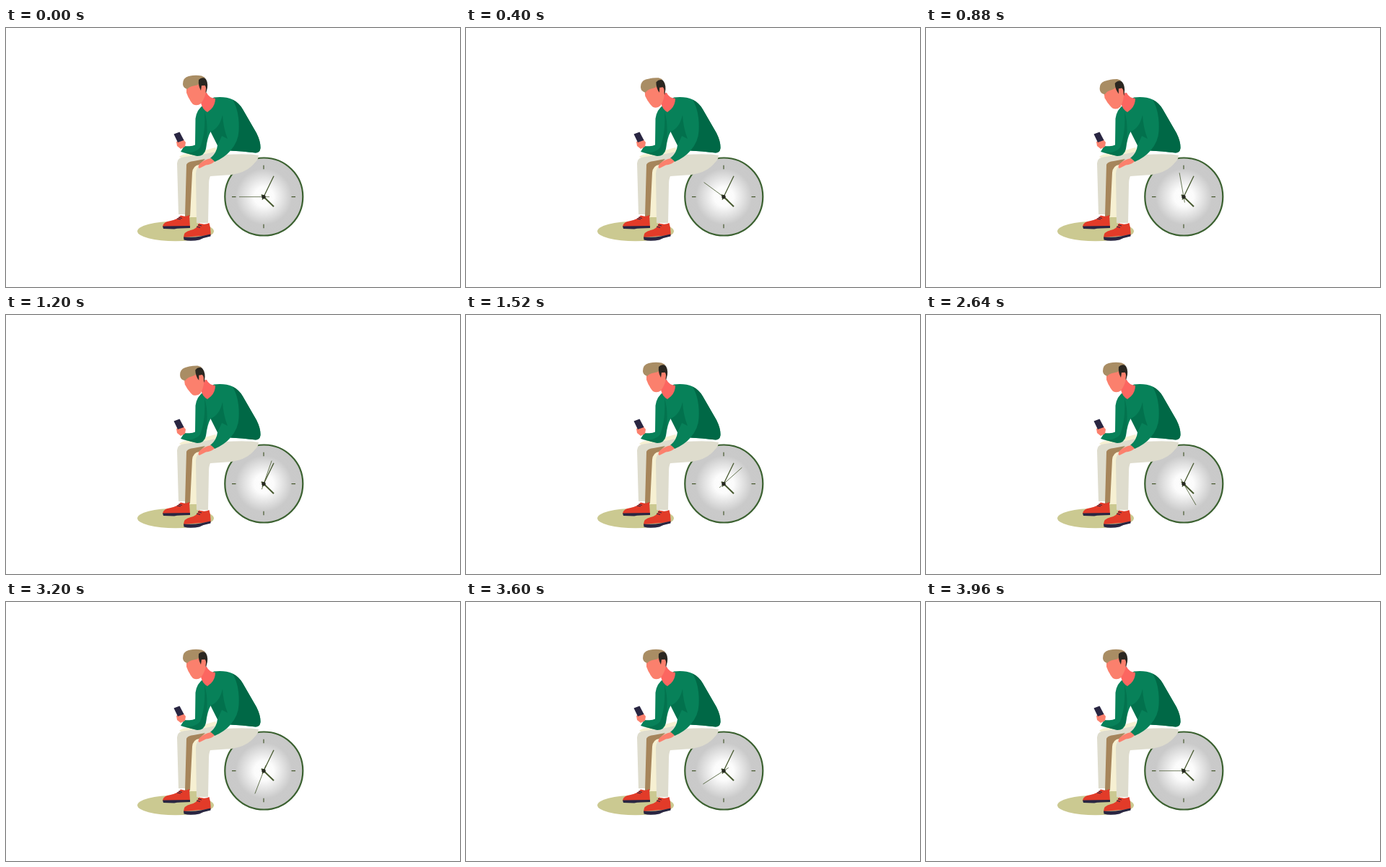
An HTML page for the animation above (4000 ms loop, 629x360 px).

```html
<!DOCTYPE html>
<html lang="en">
<head>
<meta charset="utf-8">
<title>Waiting on the clock</title>
<style>
  html, body { margin: 0; width: 100%; height: 100%; overflow: hidden; background: #fff; }
  svg { display: block; width: 100vw; height: 100vh; }
  .skin { fill: #fb806d; }
  .pants { fill: #dedccd; }
  .cream { fill: #f6f0d2; }
  .olive { fill: #cbc991; }
  .knit { fill: #078159; }
  .shade { fill: #006846; }
  .red { fill: #e23b29; }
  .navy { fill: #292642; }
  .marks { fill: none; stroke: #47592f; }
</style>
</head>
<body>
<svg viewBox="0 0 629 360">
  <defs>
    <radialGradient id="dial">
      <stop offset="0" stop-color="#fff"/>
      <stop offset=".25" stop-color="#fbfbfb"/>
      <stop offset=".72" stop-color="#cacaca"/>
      <stop offset="1" stop-color="#c9c9c9"/>
    </radialGradient>
  </defs>

  <!-- ground -->
  <ellipse class="olive" cx="235" cy="282.5" rx="53" ry="13.7"/>
  <path class="olive" d="M253 262H266V282H253Z"/>

  <!-- clock -->
  <g transform="translate(357 234.7)">
    <circle r="54" cx=".3" cy="-.2" fill="url(#dial)" stroke="#3b6130" stroke-width="2.2"/>
    <g class="marks" stroke-width="1.2">
      <path d="M0-44V-38.5M0 38V43.5M38.5 0H44M-44 0H-38.5"/>
      <path d="M-2 4 14-29" stroke-width="1.3"/>
      <path d="M-3-3 14 13.5" stroke-width="2"/>
      <path id="second" d="M0 8V-34" stroke-width=".75"/>
    </g>
    <circle r="2.7" fill="#25291f"/>
  </g>

  <!-- far leg -->
  <path class="cream" d="M240 179Q246 173 262 174L290 166 300 178 266 200 265 263H254L257 190Z"/>
  <path class="pants" d="M237 188Q237 180 248 179L272 176 290 172V184L251 188 249 259H239Z"/>
  <path fill="#a6855b" d="M250 190Q251 186 260 185L276 182 268 190Q259 191 258 201L255 262H248Z"/>
  <path class="red" d="M217 276Q218 269 228 268 238 266 242 260.5 249 263 254 260L255 277Z"/>
  <path class="navy" d="M217 275.5 255 275V278Q240 278 233 279.5L218 279Z"/>
  <path d="M237 265 242 266M239 263 244 264.5" stroke="#292642"/>

  <!-- near leg -->
  <path class="red" d="M246 291Q246 283 256 281 265 279 267 271.5 276 274 281.500 271 284 278 283.500 288Z"/>
  <path class="navy" d="M246 290.500Q260 291.500 270 289.500L283.500 286.500V289.500Q275 291 268 294.500 256 297 246.500 294.500Z"/>
  <path d="M264 276 269 277.500M266 273.500 271 275" stroke="#292642"/>
  <path class="pants" d="M264 271 263 203Q263 192 274 187L306 172 349 174Q352 180 345 187 334 201 312 204L283 206Q281 210 281 218L280 271Z"/>
  <path fill="#fff" d="M304 170 350 170V177Q335 174 304 176Z"/>

  <!-- sweater -->
  <path class="knit" d="M288 96.500Q304 95 313 99 323 104 328 113L347 146Q353 158 352.500 167 352 173 346 173.500 326 171 311 170.500 303 180 289 186L283 181Q292 174 293 163L283.500 144Q279 152 277 168 275 178 265 178L242 172 247 164Q257 165 262 162.500L262.500 126Q264 113 275 106Z"/>
  <path class="shade" d="M314 99.500Q323 104 328 113L347 146Q353 158 352.500 167 352 173 346 173.500 326 171 311 170.500 322 158 322.500 143 324 117 314 99.500Z"/>
  <path class="shade" d="M300 121Q301 139 307 154L299 150 293 163 283.500 144Q296 139 300 121Z" opacity=".65"/>
  <path class="shade" d="M275 116Q281 133 277 166 274 178 265 178L244 173Q262 175 269 166 277 146 275 116Z" opacity=".55"/>

  <!-- hands and phone -->
  <path class="skin" d="M284 181 289 185.500Q284 190 277 190.500L268 195Q265 194 268 189Q274 183 284 181Z"/>
  <path class="skin" d="M236 158 245 154 249 159 248 165 242 168 237 164Z"/>
  <path class="navy" d="M232.500 147.500 240.500 144.500 246.500 156 238 159Z"/>

  <!-- neck and head -->
  <path fill="#fc6660" d="M271 91 278 90Q281 97 290 98 290 107 284 113L279 117Q272 113 270 104Z"/>
  <g id="head">
    <path class="skin" d="M250 80 268 72 278 82Q277 96 270 105 265 109 259 106 253 99 250 90Z"/>
    <path fill="#a98d64" d="M245 78Q245 69 253 67 262 65 271 66.500L276 69 270 73Q269 79 262 80 254 81 251 85 245 83 245 78Z"/>
    <path fill="#2b2721" d="M267 72Q271 68 276 70 280 74 279 83L277 91 275 80 271 80 270 87Q266 80 267 72Z"/>
    <ellipse class="skin" cx="274.200" cy="85.500" rx="2.800" ry="5.800" transform="rotate(8 274 85)"/>
  </g>
</svg>
<script>
const LOOP = 4000, STEP = 40;
const second = document.getElementById('second');
const head = document.getElementById('head');
const start = performance.now();

const ease = (t, from, to) => {
  const p = Math.min(1, Math.max(0, (t - from) / (to - from)));
  return p * p * (3 - 2 * p);
};

function draw(now) {
  const t = Math.floor(Math.max(0, now - start) % LOOP / STEP) * STEP;
  const nod = ease(t, 120, 580) - ease(t, 1120, 1500);
  second.setAttribute('transform', `rotate(${270 + 360 * t / (LOOP - STEP)})`);
  head.setAttribute('transform', `rotate(${-8.5 * nod} 298 110)`);
  requestAnimationFrame(draw);
}
draw(start);
</script>
</body>
</html>
```
